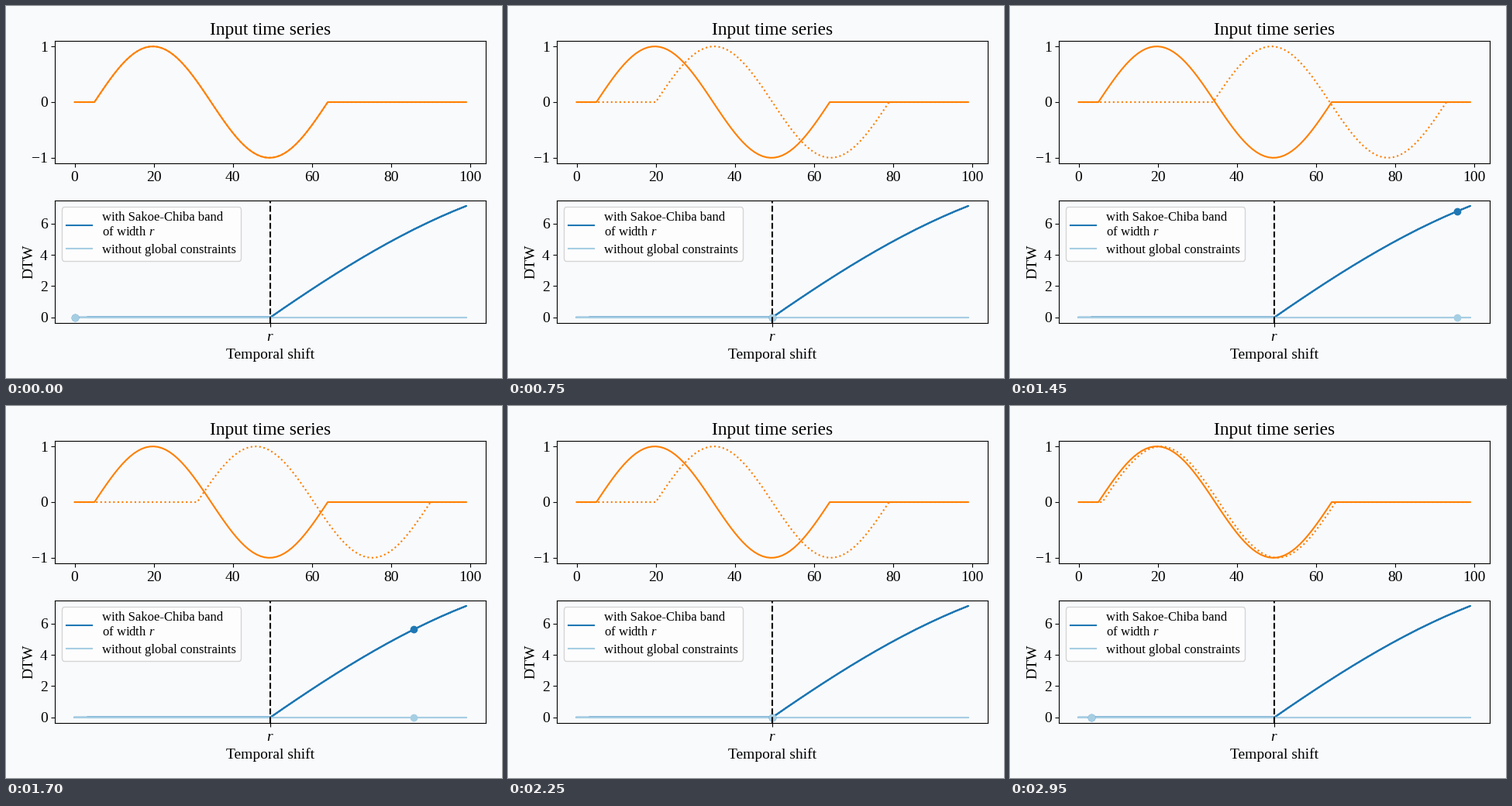
These frames come from a looping animation (640x480 px, 3 s). A matplotlib script:

```python
import numpy as np
import matplotlib.pyplot as plt
from matplotlib.animation import FuncAnimation

W, H, DPI = 640, 480, 100
BG, ORANGE, BLUE, LIGHT = "#f9fafc", "#ff7f00", "#1f78b4", "#a6cee3"
N, RADIUS, MAX_SHIFT = 100, 15, 30

plt.rcParams.update({
    "font.family": "Liberation Serif",
    "font.size": 14,
    "mathtext.fontset": "custom",
    "mathtext.rm": "Liberation Serif",
    "mathtext.it": "Liberation Serif:italic",
})


def banded_dtw(x, y, radius):
    """Dynamic time warping distance inside a Sakoe-Chiba band."""
    n = len(x)
    acc = [[np.inf] * (n + 1) for _ in range(n + 1)]
    acc[0][0] = 0.0
    x, y = x.tolist(), y.tolist()
    for i in range(1, n + 1):
        prev, row = acc[i - 1], acc[i]
        for j in range(max(1, i - radius), min(n, i + radius) + 1):
            best = min(prev[j - 1], prev[j], row[j - 1])
            row[j] = best + (x[i - 1] - y[j - 1]) ** 2
    return acc[n][n] ** 0.5


def add_axes(top, height=158.1, left=63.33, right=619.0):
    ax = fig.add_axes([left / W, 1 - (top + height) / H,
                       (right - left) / W, height / H])
    ax.set_facecolor(BG)
    return ax


time = np.arange(N)
series = np.zeros(N)
series[5:65] = np.sin(np.linspace(0, 2 * np.pi, 60))

# The shift goes up to its maximum and back again.
shifts = np.r_[0:MAX_SHIFT + 1, MAX_SHIFT - 1:0:-1]
cost = np.array([banded_dtw(series, np.roll(series, s), RADIUS)
                 for s in range(MAX_SHIFT + 1)])

fig = plt.figure(figsize=(W / DPI, H / DPI), dpi=DPI, facecolor=BG)

ax_in = add_axes(44.95)
ax_in.set_title("Input time series")
ax_in.plot(time, series, color=ORANGE)
moved, = ax_in.plot(time, series, ":", color=ORANGE)
ax_in.set_xticks(range(0, 101, 20))
ax_in.set_yticks([-1, 0, 1])
ax_in.set_xlim(-0.05 * (N - 1), 1.05 * (N - 1))
ax_in.set_ylim(-1.1, 1.1)

ax_dtw = add_axes(250.85)
ax_dtw.plot(shifts, cost[shifts], color=BLUE,
            label="with Sakoe-Chiba band\nof width $r$")
ax_dtw.plot(shifts, 0 * shifts, color=LIGHT,
            label="without global constraints")
dot_band, = ax_dtw.plot([0], [0], "o", color=BLUE)
dot_free, = ax_dtw.plot([0], [0], "o", color=LIGHT)
ax_dtw.axvline(RADIUS, color="black", linestyle="--")
ax_dtw.set_xticks([RADIUS], ["$r$"])
ax_dtw.set_yticks([0, 2, 4, 6])
ax_dtw.set_xlim(-0.05 * MAX_SHIFT, 1.05 * MAX_SHIFT)
ax_dtw.set_ylim(-0.05 * cost.max(), 1.05 * cost.max())
ax_dtw.set_xlabel("Temporal shift")
ax_dtw.set_ylabel("DTW")
ax_dtw.legend(loc="upper left", fontsize=12, borderpad=0.36,
              labelspacing=0.43)


def update(frame):
    s = shifts[frame]
    moved.set_ydata(np.roll(series, s))
    dot_band.set_data([s], [cost[s]])
    dot_free.set_data([s], [0])
    return moved, dot_band, dot_free


anim = FuncAnimation(fig, update, frames=len(shifts), interval=50,
                     repeat=True, repeat_delay=0)
plt.show()
```
